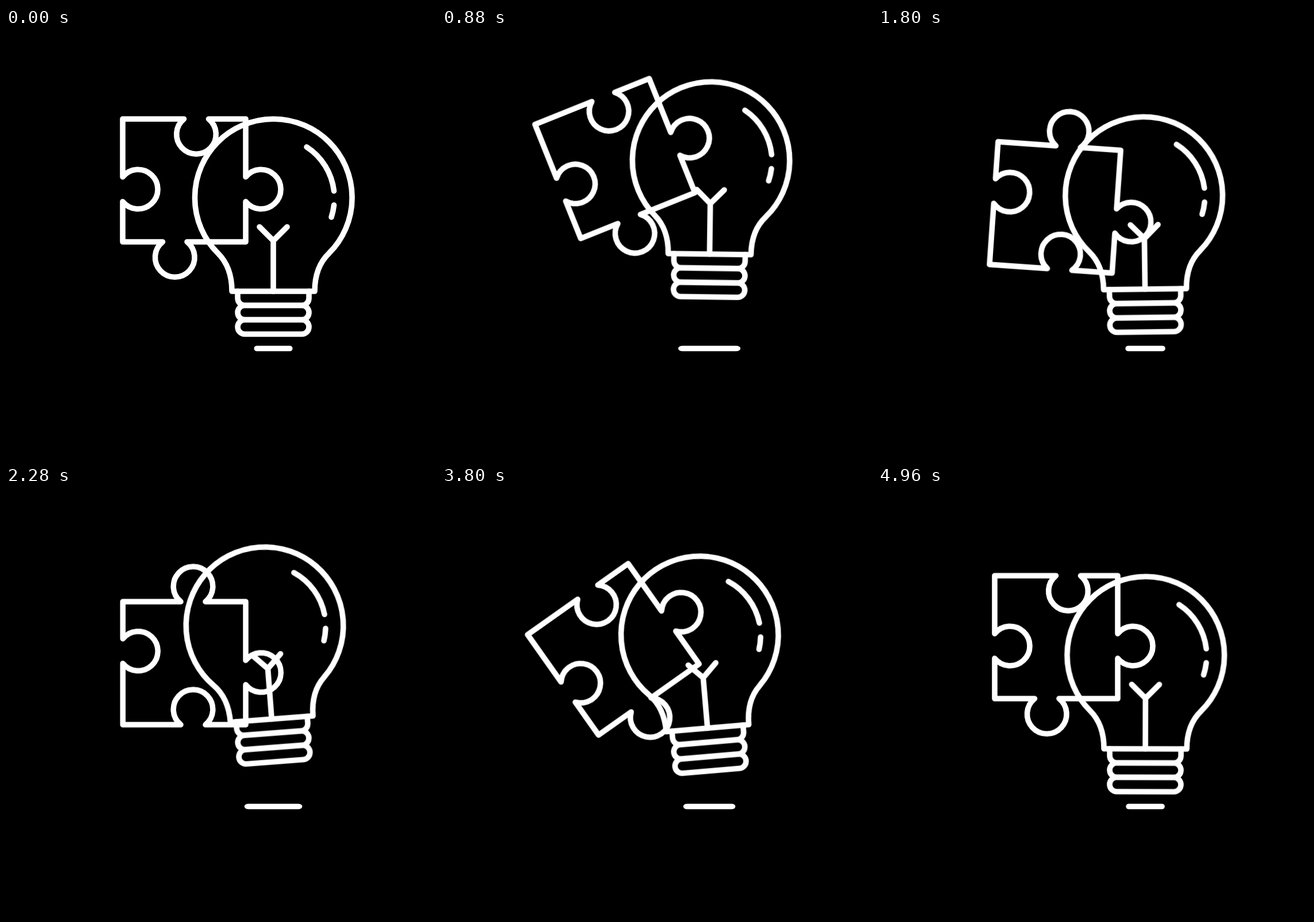
Animation, 748 px wide and 748 px high, one loop 5000 ms. Source, as an HTML page without scripts:

```html
<!DOCTYPE html>
<html lang="en">
<head>
<meta charset="utf-8">
<title>Puzzle and bulb</title>
<style>
  html, body { margin: 0; width: 100%; height: 100%; overflow: hidden; background: #000; }
  svg {
    display: block; width: 100%; height: 100%;
    fill: none; stroke: #fff; stroke-width: 9.6; stroke-linecap: round; stroke-linejoin: round;
  }
  g, .shadow {
    animation: 5s cubic-bezier(.333, 0, .667, 1) 13ms infinite both;
  }
  .bulb-lift, .bulb-sway, .shadow { animation-duration: calc(5s / 3); }
  .bulb-lift { animation-name: bulb-lift; }
  .bulb-sway { animation-name: bulb-sway; transform-origin: 465px 495px; }
  .shadow { animation-name: shadow; transform-origin: 465px 557.5px; }
  .piece-lift { animation-name: piece-lift; }
  .piece-turn { animation-name: piece-turn; transform-origin: 340.5px 295.5px; }

  @keyframes bulb-lift { 50% { transform: translateY(-65px); } }
  @keyframes bulb-sway {
    0%, 100% { transform: rotate(0deg); }
    30% { transform: rotate(-5deg); }
    70% { transform: rotate(5deg); }
  }
  @keyframes shadow {
    0%, 100% { transform: scaleX(1); }
    50% { transform: scaleX(1.62); }
  }
  @keyframes piece-lift {
    0%, 6.667%, 40%, 73.333%, 100% { transform: translateY(0); }
    23.333%, 56.667%, 90% { transform: translateY(-73px); }
  }
  @keyframes piece-turn {
    0%, 6.667%, 90%, 100% { transform: rotate(0deg); }
    40%, 56.667% { transform: rotate(-90deg); }
  }
</style>
</head>
<body>
<svg viewBox="0 0 748 748">
  <g class="piece-lift">
    <g class="piece-turn">
      <path d="M203 158.2H309.5A34.3 34.3 0 1 0 352.5 158.2H417V259A34.3 34.3 0 1 1 417 302V372H315A34.3 34.3 0 1 1 272.5 372H203V302A34.3 34.3 0 1 0 203 259Z"/>
    </g>
  </g>
  <g class="bulb-lift">
    <g class="bulb-sway">
      <!-- glass -->
      <path d="M393 458C393 430 384 407 368.5 391.7A136.8 136.8 0 1 1 562 391.7C546 407 537 430 537 458Z"/>
      <!-- filament -->
      <path d="M441 346L465 370L489 346M465 370V458"/>
      <!-- highlights -->
      <path d="M523 207A105.5 105.5 0 0 1 570.5 283.5M570.5 308A106 106 0 0 1 566 329"/>
      <!-- screw -->
      <path d="M403 458V470A12.5 12.5 0 0 0 415.5 482.5H514.5A12.5 12.5 0 0 0 527 470V458"/>
      <rect x="403" y="482.5" width="124" height="25" rx="12.5"/>
      <rect x="403" y="507.5" width="124" height="25" rx="12.5"/>
    </g>
  </g>
  <path class="shadow" d="M436.3 557.5H493.7"/>
</svg>
</body>
</html>
```
